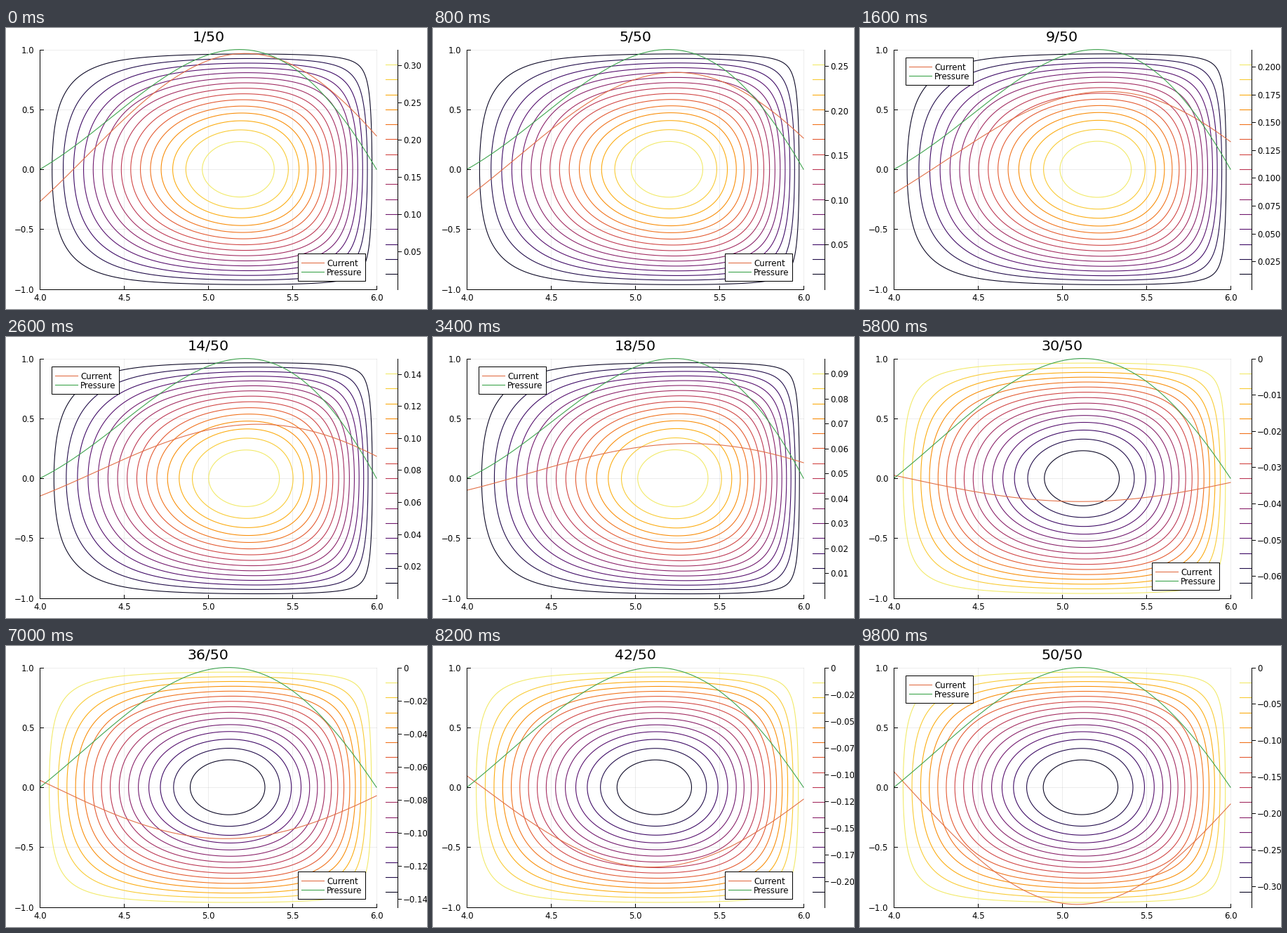
Write a matplotlib script that moves like this. It is 600 by 400 pixels and loops after 10000 ms.

```python
import numpy as np
import matplotlib.pyplot as plt
from matplotlib.animation import FuncAnimation

plt.rcParams["font.family"] = "DejaVu Sans"

W, H, DPI, STEPS = 600, 400, 100, 50
PX = 72 / DPI
LEFT, RIGHT, TOP, BOTTOM = 48.4, 528, 30.6, 371.6
BAR = 558.3
CURRENT, PRESSURE = "#E26F46", "#3DA44D"
CMAP = plt.get_cmap("inferno")
SMALL, LARGE = 11.7 * PX, 20.5 * PX

# Plasma state over the run: axis flux and edge currents per unit of drive
KEYS = [1, 9, 18, 23, 24.5, 25.5, 30, 42, 50]
FLUX = [.334, .337, .343, .3465, .3465, .3305, .3305, .3291, .3288]
INNER = [-.281, -.3125, -.357, -.225, -.225, -.125, -.125, -.14, -.13]
OUTER = [.29, .36, .464, .56, .56, .175, .175, .147, .14]
GAIN = 3.05

# Radial part of the Grad-Shafranov operator, diagonalised once
N = 140
R = np.linspace(4, 6, N + 1)
Z = np.linspace(-1, 1, 141)
Ri, dr = R[1:-1], R[1] - R[0]
OP = (np.diag(np.full(N - 1, 2 / dr**2))
      + np.diag(-1 / dr**2 + 1 / (2 * dr * Ri[:-1]), 1)
      + np.diag(-1 / dr**2 - 1 / (2 * dr * Ri[1:]), -1))
EIG, VEC = [a.real for a in np.linalg.eig(OP)]
ODD = 2 * np.arange(9) + 1
KZ = ODD * np.pi / 2
WEIGHT = 4 / np.pi * (-1.0) ** np.arange(9) / ODD
COS = np.cos(np.outer(Z, KZ))


def sx(r):
    return LEFT + (r - 4) / 2 * (RIGHT - LEFT)


def sy(z):
    return (TOP + BOTTOM) / 2 - z * (BOTTOM - TOP) / 2


def modes(src, lam):
    out = np.zeros((len(KZ), N + 1))
    for m, k in enumerate(KZ):
        out[m, 1:-1] = WEIGHT[m] * (VEC @ (src / (EIG + k * k - lam)))
    return out


def equilibrium(n):
    """Normalised flux map, its midplane profile and the current per drive."""
    flux, jl, jr = (np.interp(n, KEYS, v) for v in (FLUX, INNER, OUTER))
    p = 0.3 * (jr - jl * 2 / 3)
    f = 4 * jl - 16 * p
    src = np.linalg.solve(VEC, (p * Ri**2 + f) / GAIN)
    lo, hi = 0, EIG.min() + KZ[0] ** 2
    for _ in range(40):
        lam = (lo + hi) / 2
        if modes(src, lam).sum(0).max() < flux:
            lo = lam
        else:
            hi = lam
    x = modes(src, lo)
    mid = x.sum(0)
    cur = p * R + (f + GAIN * lo * mid) / R
    return COS @ x / mid.max(), mid / mid.max(), cur, flux


def tick_step(top):
    for base in (1, 5, 2, 2.5):
        for e in range(-5, 0):
            step = base * 10.0**e
            if 5 <= int(top / step + 1e-9) <= 9:
                return step, -e + (base == 2.5)
    return top, 3


fig = plt.figure(figsize=(W / DPI, H / DPI), dpi=DPI, facecolor="white")
ax = fig.add_axes([0, 0, 1, 1])


def line(x, y, color="black", px=1.0, z=3, **kw):
    ax.plot(x, y, color=color, lw=px * PX, zorder=z, **kw)


def label(x, y, s, size=SMALL, ha="left", z=6):
    ax.text(x, y, s, fontsize=size, ha=ha, va="center_baseline", zorder=z)


def fmt(v, d):
    return f"{v:.{d}f}".replace("-", "\u2212")


def draw_frame():
    for r in np.arange(4, 6.1, 0.5):
        x = sx(r)
        line([x, x], [TOP, BOTTOM], px=0.7, z=1, alpha=0.1)
        line([x, x], [BOTTOM, BOTTOM - 5], z=5)
        label(x, 383.5, f"{r:.1f}", ha="center")
    for z in np.arange(-1, 1.1, 0.5):
        y = sy(z)
        line([LEFT, RIGHT], [y, y], px=0.7, z=1, alpha=0.1)
        line([LEFT, LEFT + 5], [y, y], z=5)
        label(40.5, y, fmt(z, 1), ha="right")
    line([LEFT, LEFT, RIGHT], [TOP, BOTTOM, BOTTOM], z=5)
    line([BAR, BAR], [TOP, BOTTOM], z=5)


def draw_bar(s, top, colors):
    for i, c in enumerate(colors, 1):
        y = BOTTOM - i / 16 * (BOTTOM - TOP)
        line([541, BAR], [y, y], c, 1.1)
    step, digits = tick_step(top)
    start = TOP if s < 0 else BOTTOM
    sign = 1 if s < 0 else -1
    for i in range(0 if s < 0 else 1, int(top / step + 1e-9) + 1):
        y = start + sign * i * step / top * (BOTTOM - TOP)
        line([BAR, BAR + 5], [y, y], z=5)
        label(566, y, fmt(-sign * i * step, digits) if i else "0")


def draw_legend(at_top):
    x, y = (64.5, 42) if at_top else (415.5, 321.2)
    ax.add_patch(plt.Rectangle((x, y), 96.5, 39, fc="white", ec="black",
                               lw=PX, zorder=7))
    for dy, name, c in ((13.2, "Current", CURRENT),
                        (26.2, "Pressure", PRESSURE)):
        line([x + 5.5, x + 37.5], [y + dy, y + dy], c, 1.1, 8)
        label(x + 41.5, y + dy, name, z=8)


def draw(i):
    n = i + 1
    s = 1 - n / 25
    ax.clear()
    ax.set(xlim=(0, W), ylim=(H, 0))
    ax.axis("off")
    draw_frame()
    psi, mid, cur, flux = equilibrium(n)
    colors = [CMAP(k / 16) for k in range(1, 16)]
    if n != 25:
        ax.contour(sx(R), sy(Z), psi, np.arange(1, 16) / 16,
                   colors=colors if s > 0 else colors[::-1],
                   linewidths=1.1 * PX, zorder=2)
        draw_bar(s, abs(s) * flux, colors)
    line(sx(R), sy(s * cur), CURRENT, 1.1)
    line(sx(R), sy(mid), PRESSURE, 1.1, 4)
    draw_legend(8 <= n <= 25 or n >= 44)
    label(288.3, 11.5, f"{n}/{STEPS}", LARGE, "center")
    return []


anim = FuncAnimation(fig, draw, frames=STEPS, interval=200,
                     init_func=lambda: [], repeat=True, repeat_delay=0)
plt.show()
```
